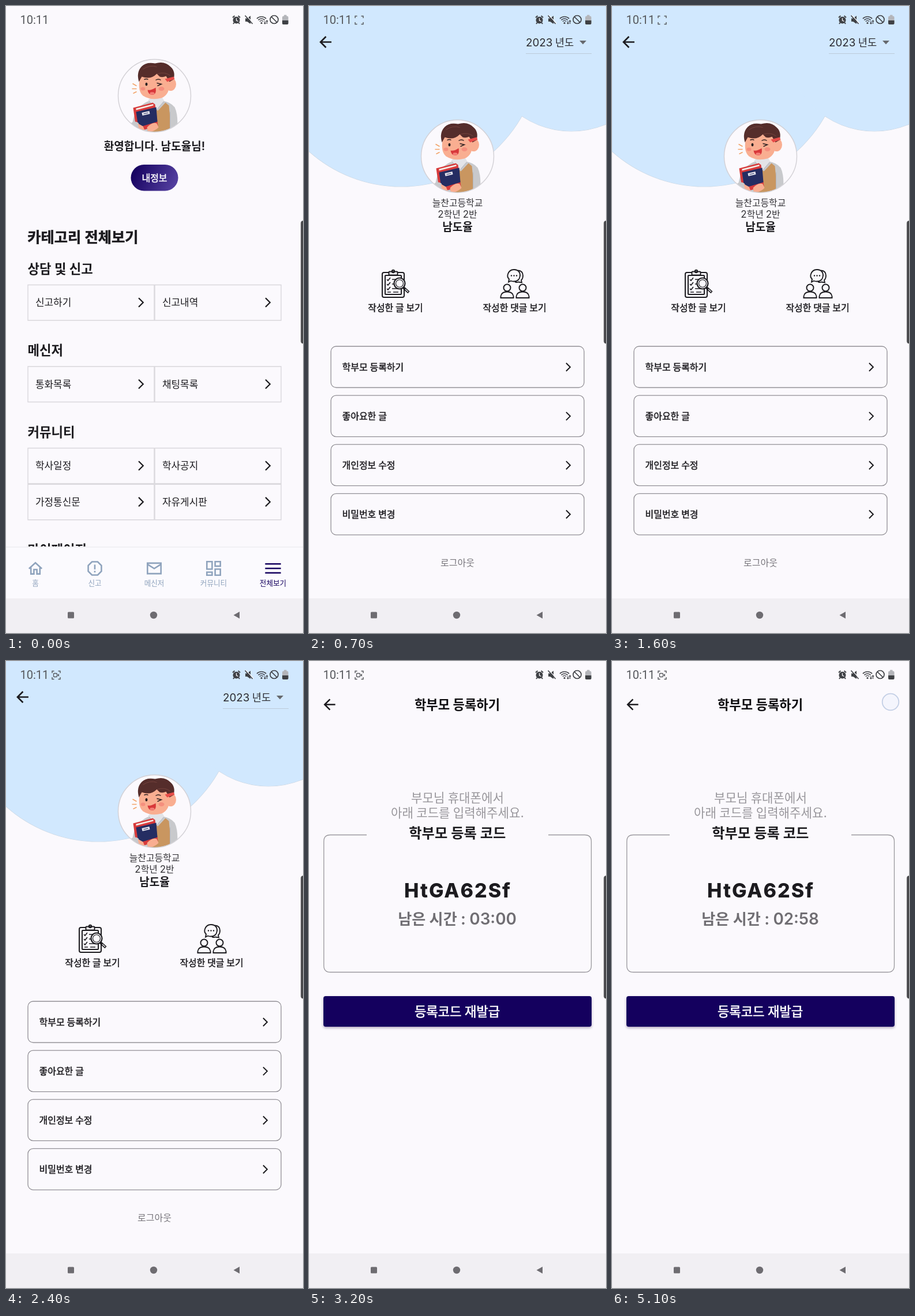
An HTML page with a canvas that plays this animation: 515x1087 px, repeating every 5200 ms.

```html
<!DOCTYPE html>
<html lang="ko">
<head>
<meta charset="utf-8">
<style>
html, body { margin: 0; width: 100%; height: 100%; overflow: hidden; background: #fbf9fd; }
canvas { display: block; width: 515px; height: 1087px; }
</style>
</head>
<body>
<canvas id="stage"></canvas>
<script>
const W = 515, H = 1087, PAGE_H = 1027, LOOP = 5200, STEP = 100;
const BG = '#fbf9fd', INK = '#1c1b1f', NAVY = '#14005e', SLATE = '#8fa3bd';
const PERSON = '남도율', SCHOOL = '늘찬고등학교';
const HANGUL = '"Noto Sans CJK KR","Noto Sans CJK JP","Noto Sans CJK",sans-serif';
// Extra outline, in em, for weights between those installed.
const EMBOLDEN = { 500: 0.028, 800: 0.022 };

const canvas = document.getElementById('stage');
const c = canvas.getContext('2d');
const dpr = window.devicePixelRatio || 1;
canvas.width = W * dpr;
canvas.height = H * dpr;

const clamp = (v, a = 0, b = 1) => Math.min(b, Math.max(a, v));

// Hangul and Latin runs use different faces at matched optical sizes.
function text(str, x, y, size, { weight = 400, color = INK, align = 'left' } = {}) {
  const runs = str.match(/ +|[!-~]+|[^ -~]+/g).map(s => {
    if (s[0] === ' ') return { w: size * 0.23 * s.length };
    const latin = s.charCodeAt(0) < 128;
    const font = latin
      ? `${weight} ${size}px Inter,sans-serif`
      : `${weight} ${size * 0.94}px ${HANGUL}`;
    c.font = font;
    return { s, font, latin, w: c.measureText(s).width };
  });
  if (align === 'center') x -= runs.reduce((sum, r) => sum + r.w, 0) / 2;
  const base = y + size * 0.36, extra = EMBOLDEN[weight];
  c.fillStyle = c.strokeStyle = color;
  for (const r of runs) {
    if (r.s) {
      c.font = r.font;
      c.fillText(r.s, x, base);
      if (extra && !r.latin) {
        c.lineWidth = size * extra;
        c.strokeText(r.s, x, base);
      }
    }
    x += r.w;
  }
}
const centered = (str, x, y, size, opt) => text(str, x, y, size, { ...opt, align: 'center' });

function at(x, y, scale, draw) {
  c.save();
  c.translate(x, y);
  c.scale(scale, scale);
  draw();
  c.restore();
}

function fill(color, d) {
  c.fillStyle = color;
  c.fill(new Path2D(d));
}

function stroke(color, width, d) {
  c.strokeStyle = color;
  c.lineWidth = width;
  c.stroke(new Path2D(d));
}

function ellipse(color, x, y, rx, ry = rx) {
  c.fillStyle = color;
  c.beginPath();
  c.ellipse(x, y, rx, ry, 0, 0, 7);
  c.fill();
}

function ring(color, width, x, y, r) {
  c.strokeStyle = color;
  c.lineWidth = width;
  c.beginPath();
  c.arc(x, y, r, 0, 7);
  c.stroke();
}

function box(x, y, w, h, r, color, outline) {
  c.beginPath();
  c.roundRect(x, y, w, h, r);
  if (color) { c.fillStyle = color; c.fill(); }
  if (outline) { c.strokeStyle = outline; c.stroke(); }
}

const chevron = (x, y, s = 1) => at(x, y, s, () => stroke(INK, 2.2, 'M-4 -7.8L3.8 0L-4 7.8'));
const backArrow = (x, y, s) => at(x, y, s, () => stroke(INK, 2.6, 'M10.4 0H-8M.9 -9.5L-8.6 0L.9 9.5'));

function avatar(x, y) {
  at(x, y, 1, () => {
    c.save();
    ellipse(BG, 0, 0, 63);
    c.beginPath();
    c.arc(0, 0, 62.5, 0, 7);
    c.clip();
    const skin = '#f9ae91', grey = '#c8c9cc', brown = '#552d2b';
    // torso
    fill(grey, 'M-12 10Q-34 20 -38 46V66H39Q42 34 35 20Q28 11 14 9Z');
    fill('#c99660', 'M-12 14L6 26L19 12L25 17Q28 40 26 66H-12Z');
    fill('#e3e4e8', 'M-11 8L4 24L17 9L12 1H-6Z');
    stroke('#b4b6bd', 1, 'M-10 9L4 24L16 10M27 28V62');
    // head
    ellipse(skin, 28, -20, 9.5, 11.5);
    fill(skin, 'M-26 -27Q-29 -8 -20 0Q-6 9 12 4Q28 -2 26 -28L20 -44H-20Z');
    ellipse('#f58f7e', -20, -12, 4, 3);
    ellipse('#f58f7e', 12, -12, 5, 3.5);
    ellipse('#2b2021', -14, -20, 2, 2.7);
    stroke('#2b2021', 1.4, 'M4 -22L12 -20L5 -17M-18 -28Q-14 -30 -11 -28M2 -27Q7 -30 11 -27');
    fill('#d8383a', 'M-12 -10Q-5 -9 2 -14Q4 -2 -4 -1.5Q-11 -2 -12 -10Z');
    ellipse('#f47e76', -4, -4, 4, 2.2);
    fill(brown, 'M-27 -24Q-32 -41 -22 -51Q-14 -59 1 -56Q18 -61 28 -50Q37 -42 33 -28L26 -24L20 -34Q14 -31 9 -33L4 -38Q-7 -27 -22 -33Z');
    stroke('#7a4740', 0.9, 'M-20 -46Q-8 -54 4 -50M5 -38Q18 -42 27 -35');
    fill('#e84d49', 'M18 -29L33 -33L35 -29L22 -24Z');
    stroke('#f2a268', 1.6, 'M-31 -17L-38 -21M-31 -12H-39M-31 -7L-37 -4');
    // books and hands
    fill('#d73a3b', 'M-37 21L-3 12L1 15L6 52L-31 63Z');
    fill('#f6eee8', 'M-32 22L-2 14.5V17L-32 25Z');
    fill('#252d62', 'M-32 28L3 20L5 45L-28 55Z');
    fill('#e8e7ef', 'M-22 29.5L-9 26.5L-8 31.5L-21 34.5Z');
    stroke('#252d62', 1, 'M-19 31.5L-11 29.7');
    fill(grey, 'M-40 47Q-34 43 -28 47L-20 66H-43Z');
    fill(skin, 'M-29 48L-20 53L-16 62H-26Z');
    fill(skin, 'M-13 55Q-4 45 4 48L7 55Q1 61 -11 64Z');
    c.restore();
    ring('#d2d0d5', 1.4, 0, 0, 63);
  });
}

function cell(label, x, y) {
  c.lineWidth = 1.4;
  box(x + 0.5, y + 0.5, 219, 61.5, 0, null, '#d9d7dc');
  text(label, x + 13.5, y + 31, 18);
  chevron(x + 196.5, y + 31);
}

const NAV = [
  ['홈', 'M-8.6 0.4L0 -7.4L8.6 .4M-6 -1.2V7.4H-2V1.5H2V7.4H6V-1.2'],
  ['신고', 'M-3.8 -8.8H3.8L8.8 -3.8V3.8L3.8 8.8H-3.8L-8.8 3.8V-3.8ZM0 -5V1.4M0 3.3V5.3'],
  ['메신저', 'M-9 -7H9V7H-9ZM-9 -5.5L0 .2L9 -5.5'],
  ['커뮤니티', 'M-9 -9H-2V1H-9ZM2 -9H9V-3H2ZM2 1H9V9H2ZM-9 5H-2V9H-9Z'],
  ['전체보기', 'M-10.5 -6H10.5M-10.5 0H10.5M-10.5 6H10.5'],
];

function menuPage() {
  avatar(257.5, 155.5);
  centered(`환영합니다. ${PERSON}님!`, 257.5, 243, 20.3, { weight: 600 });
  const g = c.createLinearGradient(220, 280, 296, 316);
  g.addColorStop(0, NAVY);
  g.addColorStop(1, '#5743a3');
  box(216.5, 275, 82, 45.5, 23, g);
  centered('내정보', 257.5, 298, 17, { weight: 500, color: '#fff' });

  text('카테고리 전체보기', 37.3, 400, 26.9, { weight: 800 });
  const groups = [
    ['상담 및 신고', 455, ['신고하기', '신고내역']],
    ['메신저', 596.5, ['통화목록', '채팅목록']],
    ['커뮤니티', 738, ['학사일정', '학사공지', '가정통신문', '자유게시판']],
    ['마이페이지', 942, []],
  ];
  for (const [name, y, items] of groups) {
    text(name, 37.5, y, 23.7, { weight: 600 });
    items.forEach((s, i) => cell(s, 37.5 + (i % 2) * 220, y + 28 + (i >> 1) * 62.7));
  }

  c.fillStyle = '#f1f0f4';
  c.fillRect(0, 937, W, 2);
  c.fillStyle = '#fbfafe';
  c.fillRect(0, 939, W, 100);
  NAV.forEach(([label, d], i) => {
    const x = 51 + i * 103, color = i === 4 ? NAVY : SLATE;
    at(x, 975, 1.3, () => stroke(color, 2, d));
    centered(label, x, 1000, 13.4, { color });
  });
}

function clipboard() {
  c.lineWidth = 2;
  box(-23, -20, 38, 43, 3, BG, INK);
  box(-18, -15, 28, 33, 1, null, INK);
  box(-11.5, -21.5, 15, 6, 1, BG, INK);
  ring(INK, 2, -4, -22, 2.2);
  for (const y of [-8, 0, 8]) stroke(INK, 1.7, `M-15 ${y}L-13 ${y + 2}L-9 ${y - 3}M-6 ${y}H5`);
  stroke(INK, 1.7, 'M-14 14H-8M-4 14H5');
  ellipse(BG, 7, -1, 9.5);
  ring(INK, 2.2, 7, -1, 9.5);
  ring(INK, 1.2, 7, -1, 6.5);
  stroke(INK, 4.4, 'M13.5 6L23 14.5');
  stroke(BG, 1.3, 'M17 9L22 13.5');
}

function people() {
  for (const x of [-13.5, 13.5]) {
    ring(INK, 2, x, 7, 6);
    stroke(INK, 2, `M${x - 11} 24.5V22Q${x - 10} 14 ${x} 14Q${x + 10} 14 ${x + 11} 22V24.5Z`);
  }
  stroke(INK, 1.8, 'M6 -23Q14 -22 14 -14Q14 -9 11 -6L12 -2L6 -3Q3 -2 0 -3');
  ellipse(BG, -2, -14, 11, 10.5);
  stroke(INK, 1.9, 'M-11 -3L-10 -8Q-14 -12 -12 -17Q-9 -25 -1 -24.5Q9 -24 9 -14Q8 -4 -2 -4Q-5 -4 -7 -5Z');
  for (const x of [-6, -1.5, 3]) ellipse(INK, x, -14, 1.2);
}

function profilePage() {
  for (const [x, y, r] of [[160, 73, 240], [455, 63, 154]]) {
    ring('#c9d6e2', 1.2, x, y, r);
  }
  ellipse('#d1e8fe', 160, 73, 240);
  ellipse('#d1e8fe', 455, 63, 154);
  backArrow(28.5, 62.5, 1);
  text('2023 년도', 376, 63, 18.8, { color: '#2b2b30' });
  fill('#66696e', 'M469 60H481L475 66.5Z');
  stroke('#bccbd9', 1.2, 'M376 82.5H490');

  avatar(257.5, 260.5);
  centered(SCHOOL, 257.5, 341, 16.9, { color: '#333236' });
  centered('2학년 2반', 257.5, 361, 16.9, { color: '#333236' });
  centered(PERSON, 257.5, 383, 20.3, { weight: 600 });

  at(150, 482, 1, clipboard);
  at(357, 481.5, 1, people);
  centered('작성한 글 보기', 150, 523, 16.9, { weight: 500 });
  centered('작성한 댓글 보기', 356.5, 523, 16.9, { weight: 500 });

  ['학부모 등록하기', '좋아요한 글', '개인정보 수정', '비밀번호 변경'].forEach((s, i) => {
    const y = 590 + i * 85.1;
    c.lineWidth = 1.3;
    box(38, y, 439, 71.5, 9, null, '#929096');
    text(s, 57.5, y + 36, 17, { weight: 500 });
    chevron(449.5, y + 36, 0.9);
  });
  centered('로그아웃', 257.5, 965, 17, { color: '#77757b' });
}

function codePage(t) {
  backArrow(35.5, 75.5, 0.97);
  centered('학부모 등록하기', 257, 75.5, 23.6, { weight: 600, color: '#0c0b0e' });
  const soft = { color: '#98969b' };
  centered('부모님 휴대폰에서', 257.5, 237, 22.5, soft);
  centered('아래 코드를 입력해주세요.', 257.5, 263, 22.5, soft);

  stroke('#9a989d', 1.3, 'M100 301.5H37Q25.7 301.5 25.7 313V528Q25.7 539.5 37 539.5H478Q489.5 539.5 489.5 528V313Q489.5 301.5 478 301.5H415');
  centered('학부모 등록 코드', 257.3, 298, 25.8, { weight: 600 });

  if (t >= 2550) {
    c.letterSpacing = '2px';
    centered('HtGA62Sf', 258, 398, 34, { weight: 800 });
    c.letterSpacing = '0px';
  }
  const left = 180 - clamp(Math.floor((t - 2500) / 1000), 0, 2);
  const mmss = `0${Math.floor(left / 60)}:${String(left % 60).padStart(2, '0')}`;
  centered(`남은 시간 : ${mmss}`, 257, 447, 27.8, { weight: 600, color: '#706e73' });

  c.save();
  c.shadowColor = 'rgba(20,0,60,.35)';
  c.shadowBlur = 4 * dpr;
  c.shadowOffsetY = 2 * dpr;
  box(25, 581, 465, 53, 4, NAVY);
  c.restore();
  centered('등록코드 재발급', 257, 607.5, 23.6, { weight: 500, color: '#fff' });
}

function page(draw, scale = 1, alpha = 1) {
  c.save();
  c.globalAlpha = alpha;
  c.translate(W / 2, PAGE_H / 2);
  c.scale(scale, scale);
  c.translate(-W / 2, -PAGE_H / 2);
  c.beginPath();
  c.rect(0, 0, W, PAGE_H);
  c.clip();
  c.fillStyle = BG;
  c.fillRect(0, 0, W, PAGE_H);
  draw();
  c.restore();
}

// Zoom transition: the old page grows under a scrim, the new one scales up.
function zoom(from, to, x) {
  const e = 1 - Math.pow(1 - x, 6.4);
  page(from, 1 + 0.0385 * e);
  c.fillStyle = `rgba(0,0,0,${0.6 * clamp((x - 0.2075) / 0.21)})`;
  c.fillRect(0, 0, W, PAGE_H);
  page(to, 0.85 + 0.15 * e ** 3, clamp((x - 0.075) / 0.115));
}

function touch(x, y, r, alpha) {
  if (alpha <= 0) return;
  c.save();
  c.globalAlpha = alpha;
  ellipse('rgba(240,242,252,.5)', x, y, r);
  ellipse('rgba(245,246,255,.25)', x, y, r * 0.7);
  ring('rgba(182,197,224,.8)', 1.8, x, y, r - 0.5);
  c.restore();
}

function statusBar(t) {
  const ink = '#55575b';
  c.fillStyle = ink;
  c.font = '20px Roboto,sans-serif';
  c.fillText('10:11', 24.5, 31);
  if (t >= 150) {
    at(87, 24.5, 1, () => {
      stroke(ink, 1.4, 'M-7 -3.5V-7H-3.5M3.5 -7H7V-3.5M7 3.5V7H3.5M-3.5 7H-7V3.5');
      if (Math.floor(t / 500) % 2 === 0) {
        c.lineWidth = 1.3;
        box(-4.5, -3, 6, 6, 1, null, ink);
        fill(ink, 'M2 0L5 -2.6V2.6Z');
      }
    });
  }
  const dark = '#3f4145';
  at(399.5, 24, 1, () => {
    ellipse(dark, 0, 0.5, 6);
    stroke(dark, 2, 'M-6.5 -4L-3 -7M6.5 -4L3 -7M-4 5L-5.5 7M4 5L5.5 7');
    stroke(BG, 1.3, 'M0 -3V1L3 2.5');
  });
  at(421, 24, 1, () => {
    fill(dark, 'M-6 -2.5H-3L3 -7V7L-3 3H-6Z');
    stroke(BG, 1.2, 'M-5 -8L8 6');
    stroke(dark, 1.6, 'M-6.5 -7.5L6.5 7');
  });
  at(443, 30, 1, () => {
    c.strokeStyle = dark;
    c.lineWidth = 1.6;
    for (const r of [4.5, 8, 11.5]) {
      c.beginPath();
      c.arc(0, 0, r, -2.35, -0.79);
      c.stroke();
    }
    ellipse(dark, 0, -0.5, 1.6);
    stroke(dark, 1.2, 'M6 1V-4M4.5 -1L6 1L7.5 -1M9.5 1V-5M8 -3L9.5 -5L11 -3');
  });
  ring(dark, 1.7, 465, 23.5, 7);
  stroke(dark, 1.7, 'M460 18.5L470 28.5');
  box(479, 17.5, 10.5, 14.5, 2, '#b4b5ba');
  box(482, 15.5, 4.5, 3, 0.5, '#b4b5ba');
  box(479, 25, 10.5, 7, [0, 0, 2, 2], dark);
}

function systemBars(t) {
  c.fillStyle = '#f1eff3';
  c.fillRect(0, PAGE_H, W, H - PAGE_H);
  const grey = '#6e6c71';
  box(107, 1050.5, 11, 11, 1.5, grey);
  ellipse(grey, 256, 1056, 6.2);
  fill(grey, 'M394.5 1056L405 1050V1062Z');
  statusBar(t);
  box(510.7, 371.5, 10, 214.5, 5, '#c9c8cc');
  box(511.3, 372.5, 10, 212.5, 4, '#47474a');
}

const OPEN_PROFILE = 465, OPEN_CODE = 2400, ZOOM_MS = 300;

function render(t) {
  c.setTransform(dpr, 0, 0, dpr, 0, 0);
  const code = () => codePage(t);
  const a = (t - OPEN_PROFILE) / ZOOM_MS, b = (t - OPEN_CODE) / ZOOM_MS;
  if (a <= 0) page(menuPage);
  else if (a < 1) zoom(menuPage, t < 550 ? () => {} : profilePage, a);
  else if (b <= 0) page(profilePage);
  else if (b < 1) zoom(profilePage, code, b);
  else page(code);
  systemBars(t);

  touch(258, 308, 13.5, clamp((t - 300) / 100) * clamp((600 - t) / 100));
  if (t > 2410) touch(220, 623, 13.5, clamp((2600 - t) / 100));
  touch(483, 71, 14.8, clamp((t - 5000) / 100));
}

// The screen refreshes ten times a second.
function frame() {
  const t = performance.now() % LOOP;
  render(Math.floor(t / STEP) * STEP);
  requestAnimationFrame(frame);
}
frame();
</script>
</body>
</html>
```
